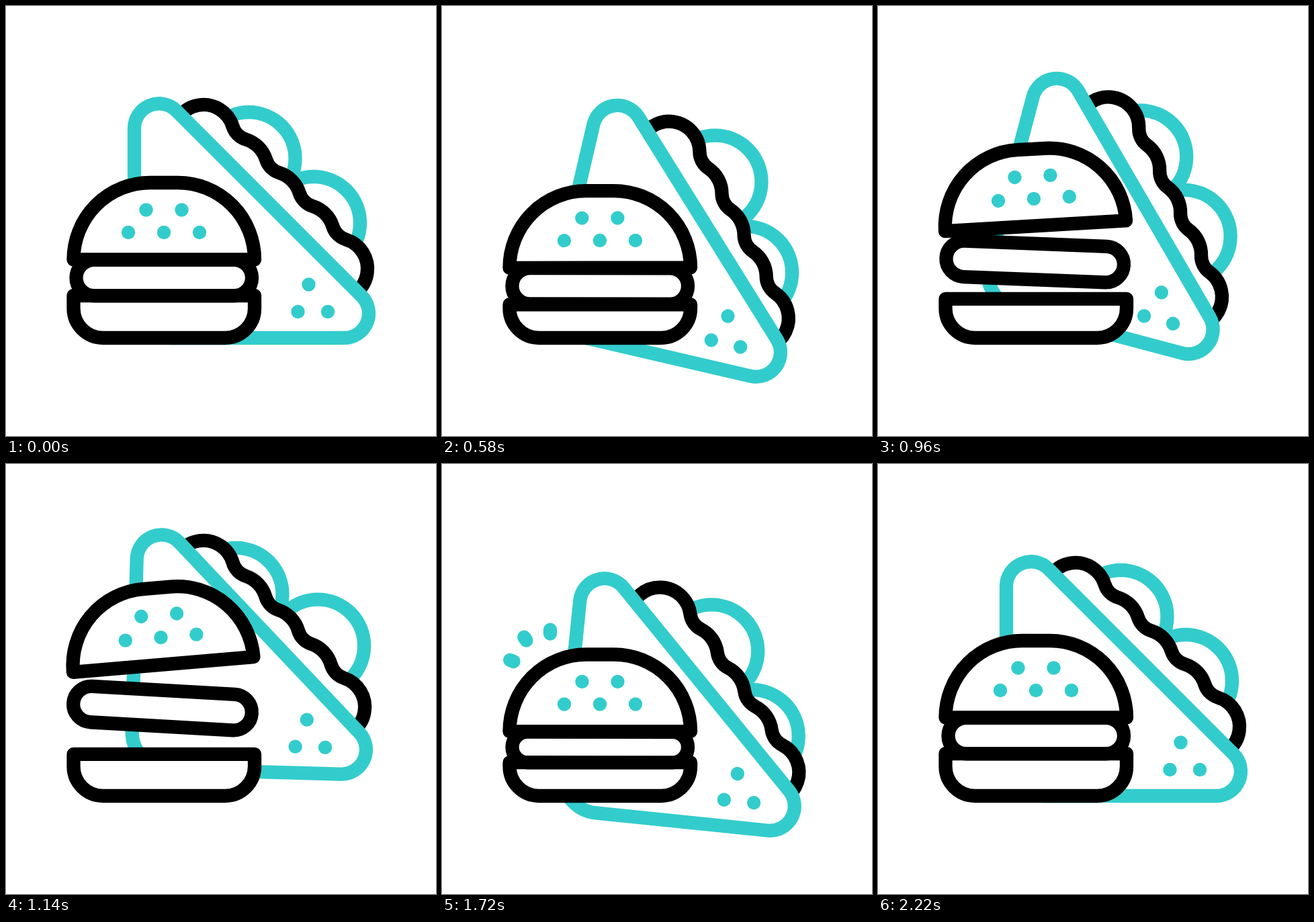
An HTML page with a canvas for the animation above (2400 ms loop, 640x640 px).

```html
<!DOCTYPE html>
<html lang="en">
<head>
<meta charset="utf-8">
<title>Burger and sandwich</title>
<style>
  html, body { margin: 0; height: 100%; overflow: hidden; background: #fff; }
  canvas { display: block; }
</style>
</head>
<body>
<canvas id="stage" width="640" height="640"></canvas>
<script>
const ctx = document.getElementById('stage').getContext('2d');
const TEAL = '#33cccc', BLACK = '#000', LOOP = 2400, START = 220, END = 2220;

function ease(t, from, to) {
  const u = Math.min(1, Math.max(0, (t - from) / (to - from)));
  return u * u * (3 - 2 * u);
}

// Eases from rest through three poses (dip, rise, settle) and back to rest.
function poses(times, values) {
  const at = [START, ...times, END], v = [0, ...values, 0];
  return t => v.reduce((sum, value, i) =>
    i ? sum + (value - v[i - 1]) * ease(t, at[i - 1], at[i]) : sum, 0);
}

// Sandwich parts share one bounce; a lag makes a part follow later.
const swing = (lag, ...values) => poses([700 + lag / 2, 1170 + lag, 1750 + lag / 6], values);
const hop = (...values) => poses([520, 1260, 1740], values);

const motion = {
  breadY: swing(0, 36, -37, 39),
  breadTurn: swing(225, 19.8, -10.8, 7.2),
  waveX: swing(225, 16.4, -14.5, 14),
  waveY: swing(50, 61.5, -38, 53.5),
  waveTurn: swing(225, 25.5, -15.5, 12),
  leafAX: swing(120, 60.5, -38, 42),
  leafAY: swing(0, 41, -34, 52),
  leafBX: swing(120, -8, 9.5, 3.5),
  leafBY: swing(50, 92, -63, 84),
  topY: hop(14, -86, 21),
  topTurn: hop(0, -5.2, 0),
  pattyY: hop(13.5, -45, 17.3),
  pattySquash: hop(0, 0, 8),
  bunY: hop(13.5, 0, 13.2)
};

const bread = new Path2D(`M191 182 A36.7 36.7 0 0 1 253.8 156.2 L529.3 431.7
  A36.5 36.5 0 0 1 503.5 494 H247 A56 56 0 0 1 191 438 Z`);
const topBun = new Path2D(`M100.5 377.5 A114 114.5 0 0 1 214.5 263
  H256 A114 114.5 0 0 1 370 377.5 Z`);

// Scalloped edge along the x axis: five bumps joined by tangent dips.
function scallops(gap, bump, dip) {
  const span = bump + dip, height = Math.sqrt(span ** 2 - (gap / 2) ** 2);
  const dx = gap / 2 * dip / span, y = -height * bump / span;
  const end = 2 * gap + bump * Math.SQRT1_2, foot = bump * Math.SQRT1_2;
  let d = `M${-end} ${foot}`;
  for (let i = -1.5; i < 2; i++) {
    const x = i * gap;
    d += `A${bump} ${bump} 0 0 1 ${x - dx} ${y} A${dip} ${dip} 0 0 0 ${x + dx} ${y}`;
  }
  return new Path2D(d + `A${bump} ${bump} 0 0 1 ${end} ${foot}`);
}
const wave = scallops(70.2, 45.5, 30);

function circle(x, y, r) {
  const p = new Path2D();
  p.arc(x, y, r, 0, 7);
  return p;
}

function outline(path, color) {
  ctx.fillStyle = '#fff';
  ctx.strokeStyle = color;
  ctx.fill(path);
  ctx.stroke(path);
}

function dots(...points) {
  ctx.fillStyle = TEAL;
  for (const [x, y] of points) ctx.fill(circle(x, y, 10.2));
}

function moved(x, y, degrees, draw) {
  ctx.save();
  ctx.translate(x, y);
  ctx.rotate(degrees * Math.PI / 180);
  draw();
  ctx.restore();
}

function turned(px, py, dy, degrees, draw) {
  moved(px, py + dy, degrees, () => {
    ctx.translate(-px, -py);
    draw();
  });
}

function drawBurst(t) {
  const head = 36 * ease(t, 1660, 1900), tail = 36 * ease(t, 1760, 2040);
  if (head - tail < 0.01) return;
  ctx.strokeStyle = TEAL;
  for (const [x, y, degrees] of [[106.5, 294, 202], [125.5, 262.5, 236], [161, 252.5, 270]]) {
    moved(x, y, degrees, () => {
      ctx.beginPath();
      ctx.moveTo(tail, 0);
      ctx.lineTo(head, 0);
      ctx.stroke();
    });
  }
}

function drawSandwich(m) {
  outline(circle(361.5 + m.leafAX, 227 + m.leafAY, 69), TEAL);
  outline(circle(458 + m.leafBX, 323 + m.leafBY, 69), TEAL);
  moved(393.25 + m.waveX, 291.75 + m.waveY, 45 + m.waveTurn, () => outline(wave, BLACK));
  turned(365.75, 314, m.breadY, m.breadTurn, () => {
    outline(bread, TEAL);
    dots([450.5, 414.5], [434.5, 455], [479, 455]);
  });
}

function drawBurger(m) {
  outline(new Path2D(`M100.5 ${431 + m.bunY} H370 V450 A44 44 0 0 1 326 494
    H144.5 A44 44 0 0 1 100.5 450 Z`), BLACK);

  const tilt = -0.67 * m.topTurn;
  const w = 261.5 + 1.4 * tilt, h = 53.5 - m.pattySquash;
  moved(235.25 - 0.7 * tilt, 404.5 + m.pattyY, tilt, () => {
    const patty = new Path2D();
    patty.roundRect(-w / 2, -h / 2, w, h, h / 2);
    outline(patty, BLACK);
  });

  turned(235, 390, m.topY, m.topTurn, () => {
    outline(topBun, BLACK);
    dots([208.5, 303.5], [261.5, 303.5], [182, 337], [235, 337], [288, 337]);
  });
}

function frame() {
  const t = performance.now() % LOOP, m = {};
  for (const part in motion) m[part] = motion[part](t);
  ctx.fillStyle = '#fff';
  ctx.fillRect(0, 0, 640, 640);
  ctx.lineWidth = 20.3;
  ctx.lineCap = ctx.lineJoin = 'round';
  drawBurst(t);
  drawSandwich(m);
  drawBurger(m);
  requestAnimationFrame(frame);
}
frame();
</script>
</body>
</html>
```
